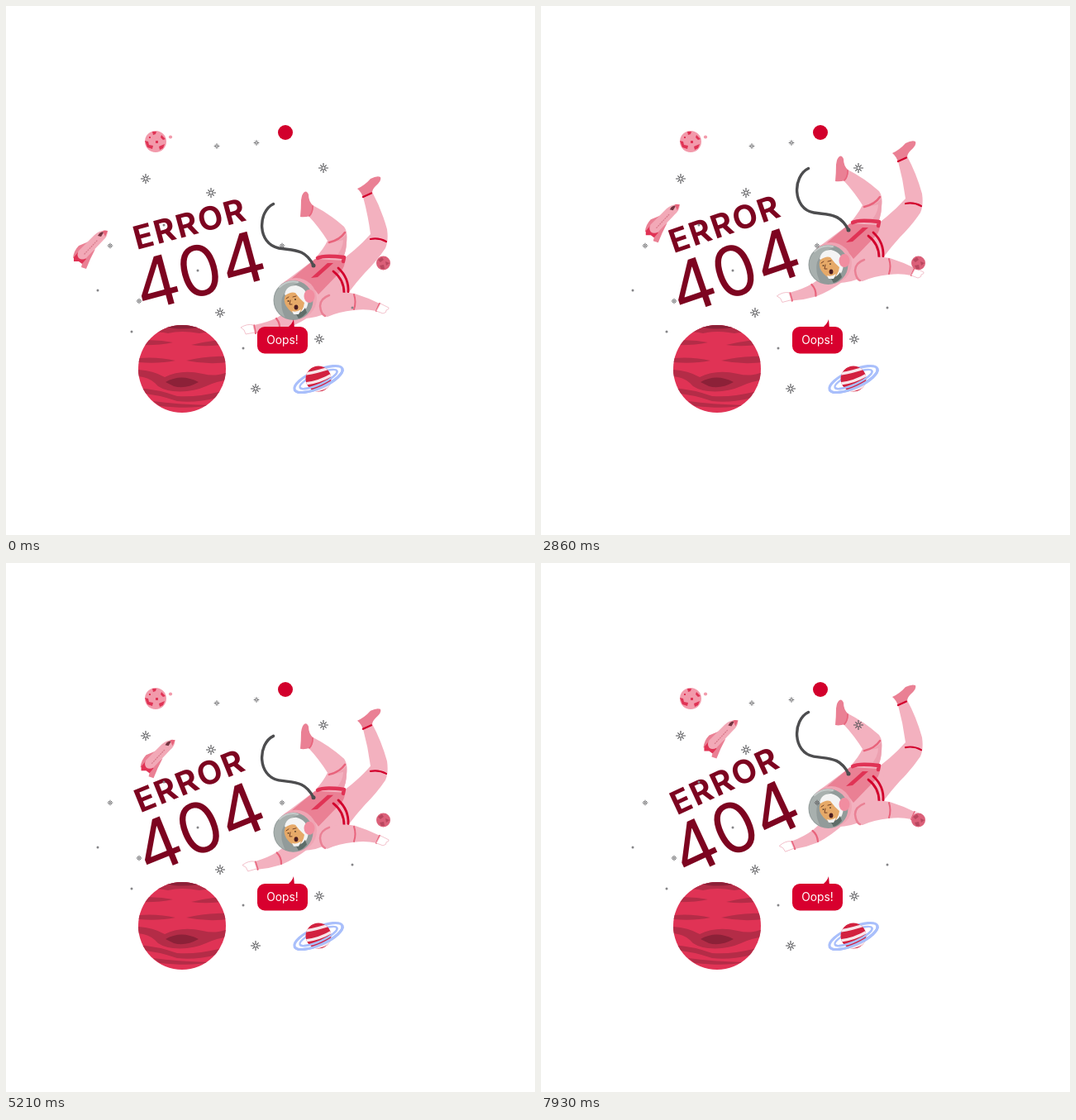
Animation, 640 px wide and 640 px high, one loop 8000 ms. Source, as an HTML page:

```html
<!DOCTYPE html>
<html lang="en">
<head>
<meta charset="utf-8">
<title>Error 404</title>
<style>
  html, body { margin: 0; width: 100%; height: 100%; overflow: hidden; background: #fff; }
  svg { display: block; width: 100vw; height: 100vh; }
  text { font-family: Inter, "Open Sans", sans-serif; text-anchor: middle; }
  .title { fill: #7d0420; }
  .light { fill: #f3b1bf; }
  .mid { fill: #ea8094; }
  .rose { fill: #e03355; }
  .red { fill: #d2002c; }
  .line { fill: none; stroke-linecap: round; }
  .hand { fill: #fff; stroke: #f0b4c0; stroke-width: .8; }
</style>
</head>
<body>
<svg viewBox="0 0 640 640">
  <defs>
    <clipPath id="bigDisc"><circle cx="213" cy="439" r="53"/></clipPath>
    <clipPath id="ringedDisc"><circle cx="378" cy="451" r="15.500"/></clipPath>
    <clipPath id="visor"><circle cx="347.500" cy="356" r="23"/></clipPath>
  </defs>

  <g id="astronaut">
    <!-- legs -->
    <path class="light" d="M432 231L443 225Q454 245 461 270Q463 284 459 293Q449 308 434 323Q424 334 415 346L404 336L402 310Q423 296 441 276Q438 253 432 231Z"/>
    <path class="mid" d="M425 221Q434 217 441 209Q449 205 453 207Q455 211 447 218Q443 222 443 226L432 232Q430 225 425 221Z"/>
    <path class="line" d="M432 231L442 226.500M441 282Q451 280 460 285" stroke="#d2002c" stroke-width="2.200"/>
    <path class="light" d="M371 241Q391 251 409 267Q414 274 412 286Q412 297 407 306L375 304Q384 294 389 284Q379 268 366 254Z"/>
    <path d="M391 287Q403 286 412 276Q413 295 407 306L398 304Q408 294 408 283Z" fill="#eda0b0"/>
    <path class="line" d="M391 286Q404 283 410 274" stroke="#e8637b" stroke-width="2.500"/>
    <path class="mid" d="M361 225Q364 223 366 228Q366 237 372 242Q372 250 368 254Q361 256 356 255Q357 245 357 235Q358 227 361 225Z"/>
    <path class="line" d="M371 242Q371 250 367 254" stroke="#e8637b" stroke-width="1.500"/>

    <!-- left arm -->
    <g id="arm">
      <path class="light" d="M300 386Q316 383 328 377Q341 370 352 358L367 376Q348 388 331 393Q317 396 302 396Z"/>
      <path class="line" d="M327 378Q332 384 331 392M300 386.500L302 396" stroke="#e8637b" stroke-width="2.200"/>
      <path class="hand" d="M299 386Q292 384 284 389L288 392L290 397L301 395Z"/>
    </g>

    <!-- torso and pack -->
    <path class="light" d="M338 333L374 306L411 304Q419 323 414 344Q408 358 390 370Q374 379 355 378Z"/>
    <path class="mid" d="M344 331Q358 319 374 306L410 308Q410 316 405 321L378 349Q368 333 344 331Z"/>
    <path class="line" d="M377 305Q384 301 409 304L408 309" stroke="#e03355" stroke-width="4.500" stroke-linejoin="round"/>
    <path class="rose" d="M369 329L377 328L396 311L389 311Z"/>
    <path class="line" d="M396 321Q409 331 409 347M402 317Q415 329 414 346" stroke="#d2002c" stroke-width="2.800"/>

    <!-- right arm -->
    <path class="light" d="M384 352Q400 344 422 348Q438 353 452 360L448 369Q435 366 421 368Q402 370 389 376Q378 376 380 360Z"/>
    <path class="line" d="M391 350Q380 354 380 363Q381 373 386 375" stroke="#ea8094" stroke-width="2.500"/>
    <path class="line" d="M421 349Q424 358 421 367M452 360L448 369" stroke="#e8637b" stroke-width="2"/>
    <path class="hand" d="M453 360L463 365Q464 367 460 368Q461 371 456 372L448 369Z"/>

    <!-- helmet -->
    <circle cx="351" cy="354" r="25" fill="#efa5b4"/>
    <circle cx="347.500" cy="356" r="24" fill="#929b9a"/>
    <g clip-path="url(#visor)">
      <path d="M323 350Q332 329 358 334Q340 338 334 353Q331 367 340 381H321Z" fill="#a8b0ae"/>
      <path d="M337 349Q339 338 351 338Q364 341 366 355Q365 369 357 370L345 355Z" fill="#f4f4f4"/>
      <path d="M338 350Q345 345 350 347Q355 354 361 359Q360 369 352 373Q344 371 339 363Q335 356 338 350Z" fill="#e6a968"/>
      <path d="M350 371Q357 373 362 365L364 371L355 380Z" fill="#5f6d69"/>
      <path class="line" d="M339 354L342 352M347 352L351 351M344 356L343 361L346 361" stroke="#754126" stroke-width="1"/>
      <circle cx="341.500" cy="357" r=".9" fill="#432"/>
      <circle cx="350" cy="355" r=".9" fill="#432"/>
      <ellipse cx="351" cy="364.500" rx="2.400" ry="3" fill="#4b1d20"/>
      <path d="M346 369Q351 371 357 367L354 373H348Z" fill="#f4f4f4"/>
    </g>
    <path class="line" d="M331 340Q341 331 353 334" stroke="#c6cbca" stroke-width="2"/>
    <ellipse cx="367" cy="351" rx="6.500" ry="8" fill="#f18da0"/>

    <path class="line" d="M323.500 239.500C304 249 304 288 330 293C347 296 362 293 372 314" stroke="#4d4d4f" stroke-width="3.400"/>
    <circle cx="372" cy="314" r="2.500" fill="#4d4d4f"/>
  </g>

  <g id="rocket">
    <path class="mid" d="M100 285L88 290Q82 296 81 305L90 302ZM108 294L102 306L97 318L91 316L94 304Z"/>
    <path class="rose" d="M87 298L97 306L92 312L88 309L82 309L82 304Z"/>
    <path d="M123 272Q113 271 107 277L88 296Q85 301 88 305Q92 308 97 305L117 284Q123 279 123 272Z" fill="#f2a9b7"/>
    <path d="M113 275Q117 272 118 274L115 279L111 278Z" fill="#743441"/>
    <path class="line" d="M95 300L110 284" stroke="#d97c8d" stroke-width="1.300" stroke-dasharray="1 2"/>
    <path d="M123 272Q119 271 117 272L120 279Z" fill="#e8637b"/>
  </g>

  <g id="word"><text class="title" x="1" y="14" font-size="39" font-weight="700" letter-spacing="2">ERROR</text></g>
  <g id="code"><text class="title" y="30.500" font-size="84" font-weight="400">404</text></g>

  <!-- small planets -->
  <circle class="red" cx="338" cy="153" r="9"/>
  <circle cx="181" cy="164" r="13" fill="#f29aab"/>
  <path class="rose" d="M168 163L172 164L173 168L178 169L177 173L171 171ZM177 152L182 152L181 155L178 156ZM188 156L193 161L190 162L187 159ZM185 170L192 167L190 172L186 174ZM181 163h3v3h-3ZM173 158h2v2h-2Z"/>
  <circle cx="199" cy="158.500" r="2.100" fill="#f29aab"/>
  <circle cx="456.500" cy="311" r="8.500" fill="#db6079"/>
  <path d="M450 307L455 304L457 307L453 310ZM459 309L464 311L460 314ZM452 314L457 313L458 318L454 318Z" fill="#b9475f"/>

  <!-- large planet -->
  <circle class="rose" cx="213" cy="439" r="53"/>
  <g clip-path="url(#bigDisc)" fill="#b42c47">
    <path d="M160 386H266V400Q250 393 234 396Q212 392 196 396Q182 392 170 398Z"/>
    <path d="M160 405Q182 403 202 407Q184 411 160 410ZM160 426Q184 424 205 429Q185 433 160 431Z"/>
    <path d="M268 403Q246 405 224 410Q244 413 268 409ZM268 424Q243 423 218 429Q243 434 268 431Z"/>
    <path d="M160 440Q178 441 192 449Q212 439 238 445Q254 449 268 443V452Q252 455 242 460Q224 468 202 466Q186 464 180 456Q172 449 160 448Z"/>
    <path d="M160 462Q185 464 207 472Q236 474 268 464V470Q236 481 207 478Q184 470 160 468Z"/>
    <path d="M178 478Q206 482 246 483Q224 488 186 484Z"/>
    <path d="M184 386H244Q226 392 202 390ZM193 455Q212 444 233 455Q217 464 203 460Z" fill="#8c2138"/>
  </g>

  <!-- ringed planet -->
  <g transform="rotate(-24 378 451.500)" fill="none" stroke="#a9bffb">
    <ellipse cx="378" cy="451.500" rx="31.500" ry="10.500" stroke-width="3.200"/>
    <ellipse cx="378" cy="451.500" rx="24.500" ry="6.500" stroke-width="2.400"/>
  </g>
  <g clip-path="url(#ringedDisc)">
    <circle cx="378" cy="451" r="16" fill="#d2213f"/>
    <path class="line" d="M362 445Q377 443 394 437M362 457Q380 455 396 445M367 467Q382 465 397 456" stroke="#f8e6ea" stroke-width="3.500"/>
  </g>
  <g transform="rotate(-24 378 451.500)" fill="none" stroke="#a9bffb">
    <path d="M346.500 451.500A31.500 10.500 0 0 0 409.500 451.500" stroke-width="3.200"/>
    <path d="M353.500 451.500A24.500 6.500 0 0 0 402.500 451.500" stroke-width="2.400"/>
  </g>

  <g id="stars" fill="none" stroke="#515154"></g>

  <!-- speech bubble -->
  <path class="red" d="M348 379L349 390H339Q346 386 348 379Z"/>
  <rect x="304" y="388" width="61" height="32.500" rx="9" fill="#d8002e"/>
  <text x="334.500" y="408.500" font-size="13.800" font-weight="400" fill="#fff">Oops!</text>
</svg>

<script>
const LOOP = 8000;
const byId = id => document.getElementById(id);

const bigStars = [[169, 209], [248, 226], [384, 196], [259, 371], [379, 403], [302, 463]];
const smallStars = [[255, 169.5], [303, 165.5], [126, 290], [334, 290], [161, 357]];
const dots = [[111, 344], [152, 394], [287, 414], [191, 265], [232, 320], [419, 365]];

function star([x, y], size) {
  let d = '';
  for (let i = 0; i < 8; i++) {
    const c = Math.cos(i * Math.PI / 4), s = Math.sin(i * Math.PI / 4);
    const reach = size * (i % 2 ? 0.85 : 1);
    d += `M${x + c * size * 0.22} ${y + s * size * 0.22}L${x + c * reach} ${y + s * reach}`;
  }
  return `<path d="${d}" stroke-width="${0.5 + size * 0.1}"/>`;
}

byId('stars').innerHTML =
  bigStars.map(p => star(p, 6)).join('') +
  smallStars.map(p => star(p, 3.3)).join('') +
  dots.map(([x, y]) => `<circle cx="${x}" cy="${y}" r="1.5" fill="#858588" stroke="none"/>`).join('');

// Linear interpolation between [time, value] keys.
function track(keys, t) {
  const i = Math.max(1, keys.findIndex(k => k[0] >= t));
  const [t0, v0] = keys[i - 1], [t1, v1] = keys[i];
  return v0 + (v1 - v0) * (t - t0) / (t1 - t0);
}

const bob = [[0, 0], [2930, -44], [4880, -26], [6000, -40], [6860, -50], [7710, -57], [8000, -59.5]];
const drift = [[0, 0], [5930, 0.8], [6900, 0.92], [8000, 1]];
const reach = [[0, 0], [2860, -4], [4430, -4.5], [5930, -6.5], [8000, -10.5]];

function place(id, transform) {
  byId(id).setAttribute('transform', transform);
}

function draw(now) {
  const t = now % LOOP;
  const p = track(drift, t);
  const tilt = -15 - 10 * p;
  place('astronaut', `translate(0 ${track(bob, t)})`);
  place('arm', `rotate(${track(reach, t)} 354 372)`);
  place('rocket', `translate(${116 * p} ${-82 * p})`);
  place('word', `translate(221.5 263.5) rotate(${tilt})`);
  place('code', `translate(234 320) rotate(${tilt})`);
  requestAnimationFrame(() => draw(performance.now() - start));
}

const start = performance.now();
draw(0);
</script>
</body>
</html>
```
